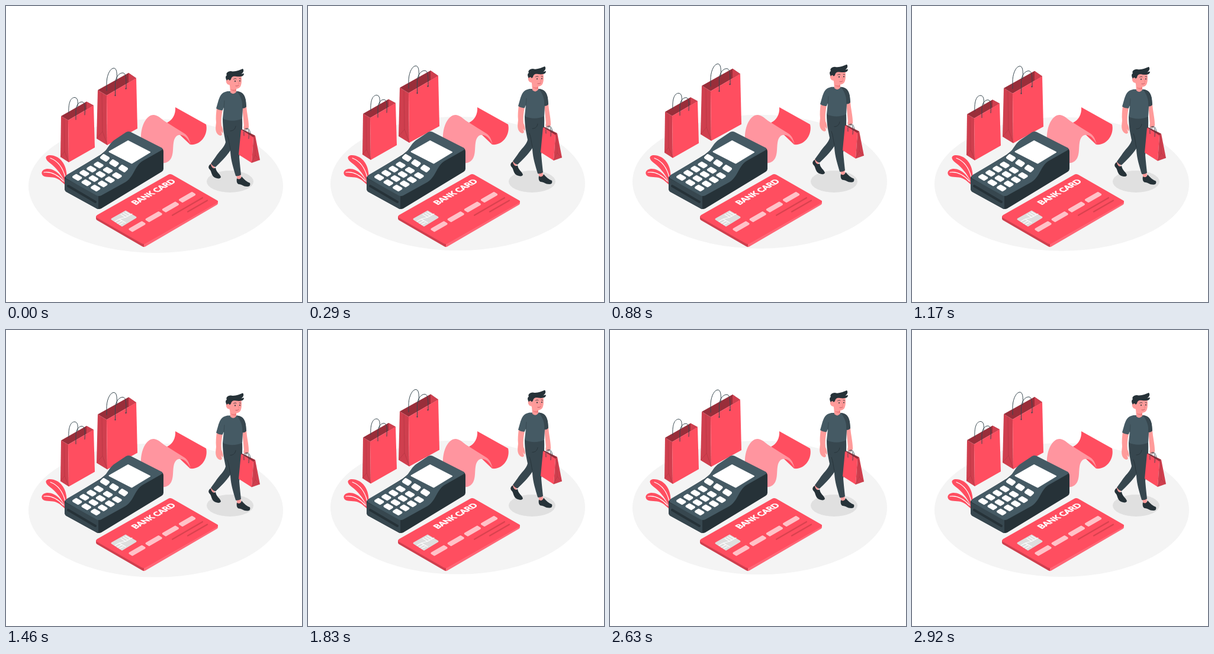
Write an HTML page with a canvas that moves like this. It is 500 px wide and 500 px high and loops after 2.96 s.

```html
<!DOCTYPE html>
<html lang="en">
<head>
<meta charset="utf-8">
<title>Card payment</title>
<style>
html, body { margin: 0; width: 100%; height: 100%; overflow: hidden; background: #fff; }
canvas { display: block; width: 500px; height: 500px; }
</style>
</head>
<body>
<canvas id="stage" width="500" height="500"></canvas>
<script>
const ctx = document.getElementById('stage').getContext('2d');
const LOOP = 2960, STEP = 1000 / 24, FLOAT = 1500, RISE = 10;
const RED = '#ff4e60', SIDE = '#cf3f4e', FOLD = '#b83845', DEEP = '#992e3a', PINK = '#ff959f';
const DARK = '#263238', SLATE = '#37474f', STEEL = '#455a64', SKIN = '#ff9b9a';

function fill(d, color) {
  ctx.fillStyle = color;
  ctx.fill(new Path2D(d));
}

function line(d, color, width) {
  ctx.strokeStyle = color;
  ctx.lineWidth = width;
  ctx.lineCap = ctx.lineJoin = 'round';
  ctx.stroke(new Path2D(d));
}

// Filled shape whose corners are rounded by its own outline
function soft(d, color, width) {
  fill(d, color);
  line(d, color, width);
}

function ellipse(x, y, rx, ry, color) {
  ctx.fillStyle = color;
  ctx.beginPath();
  ctx.ellipse(x, y, rx, ry, 0, 0, Math.PI * 2);
  ctx.fill();
}

function tile(x, y, ax, ay, bx, by) {
  return `M${x - ax - bx},${y - ay - by}L${x + ax - bx},${y + ay - by}` +
    `L${x + ax + bx},${y + ay + by}L${x - ax + bx},${y - ay + by}Z`;
}

function leaves() {
  fill('M101,303C106,279 99,263 87,255.500C77,250.500 67,251 67.500,257C68.500,263 77,266 82,272C90,280 96,289 99,297Z', RED);
  fill('M101,303C96,287 83,274 69,275C60,276 58,283 63,287C68,290 78,288 85,291C92,294 96,299 101,303Z', RED);
  line('M75,257C88,262 96,273 100,289', '#fff', 1.2);
  line('M64,281C78,279 88,286 97,296', '#fff', 1.2);
}

function smallBag() {
  fill('M93,186L136,161.500L148,168L105,193Z', DEEP);
  fill('M136,161.500L148,168L136,175Z', SIDE);
  line('M106,181C105,164 109,154.500 116,154.500C121,155 122,161 121,170', SLATE, 1);
  fill('M93,186L105,193L106,264L92,255Z', SIDE);
  fill('M105,193L148,168L150,239L106,264Z', RED);
  line('M98,190L99,246L92.500,254M99,246L106,263', FOLD, .8);
  line('M118,192V177C118,168 123,162 128,162C133,162 134,169 133,184', SLATE, 1);
}

function largeBag() {
  fill('M155,142L207,113L220,122L170,151Z', DEEP);
  fill('M207,113L220,122L207,129.500Z', SIDE);
  line('M170,143V128C171,114 177,105 182,105C187,105 188,113 187,126', SLATE, 1);
  fill('M155,142L170,151L171,235L153,224Z', SIDE);
  fill('M170,151L220,122L222,207L171,235Z', RED);
  line('M162,147L163,212L154,223M163,212L171,234', FOLD, .8);
  line('M184.500,151V131C185,120 191,113 197,113C203,113 203,123 203,139', SLATE, 1);
  ellipse(184.5, 151, 1, 1.3, SLATE);
  ellipse(202.5, 139.5, 1, 1.3, SLATE);
}

function receipt() {
  fill('M286,171L338,200C342,216 330,236 311,234L272,197C281,193 287,183 286,171Z', RED);
  fill('M228,225C227,202 238,183 250,184C259,185 264,193 272,197C282,203 291,209 300,214.500' +
    'C308,219 310,227 312,234C306,220 296,215 289,219C279,226 285,246 279,257C275,264 269,266 262,265Z', PINK);
}

function terminal() {
  fill('M99,292Q98,288 103,286L160,251L207,213L263,240Q266,242 266,246V275Q266,278 263,280' +
    'L161,342Q157,344 153,342L102,314Q99,312 99,308Z', DARK);
  fill('M99,291L156,319V343Q154,343 152,341.500L102,314Q99,312 99,308Z', SLATE);
  fill('M101,291Q99,288 103,285L156,254C172,245 171,236 182,227L203,213Q207,211 211,213' +
    'L262,239Q267,241 262,244L232,261C216,270 217,290 199,299L161,320Q157,322 153,320Z', STEEL);
  line('M105,304L151,331', DARK, 4);
  soft('M174.500,246L206,228L243,247L212.500,265.500Z', '#fff', 2);
  for (let c = 0; c < 3; c++) {
    const dx = c * 15.5, dy = c * 9;
    soft(tile(167 + dx, 256.5 + dy, 4, 2.4, 1.9, -1.9), '#fff', 4.4);
    for (let r = 0; r < 4; r++) {
      soft(tile(156.5 - r * 12.1 + dx, 268.5 + r * 7 + dy, 3.9, 2.2, 2.2, -1.4), '#fff', 4.2);
    }
  }
}

function card() {
  fill('M152,355V359Q152,361 154,362L230,406Q231.500,407 233,407V400Z', SIDE);
  fill('M233,400V407Q235,407 236,406L356,336Q358,335 358,333V329Z', '#ff6676');
  fill('M154,358Q150,356 154,353L274,285Q277,283 281,285L356,328Q360,330 356,333L236,401Q233,403 229,401Z', RED);

  ctx.save();
  ctx.transform(.866, -.5, .866, .5, 249, 314);
  ctx.font = 'bold 13.6px Lato, "Open Sans", sans-serif';
  ctx.textAlign = 'center';
  ctx.fillStyle = ctx.strokeStyle = '#fff';
  ctx.lineWidth = .7;
  ctx.fillText('BANK CARD', 0, 4.9);
  ctx.strokeText('BANK CARD', 0, 4.9);
  ctx.restore();

  soft('M179,360L202,347L219,357L196,371Z', '#dedede', 3);
  line('M184,364L191,360L202,366M188,367L195,363M192,369L198,366' +
    'M194,352L202,357L213,351M198,350L205,354M202,348L209,352M191,360L202,357', '#fff', 1.1);

  for (let i = 0; i < 4; i++) {
    soft(tile(221.5 + i * 28.2, 372.5 - i * 16.5, 10.2, -5.9, 2.2, 1.3), '#ffc2c8', 3.5);
  }
  line('M281,353.500L332,324M307,347.500L340,328.500', '#d9424f', 2.2);
}

function legs() {
  fill('M346,266L353,270L351,277L344,273Z', SKIN);
  fill('M388,282L396,281L397,292L391,294Z', SKIN);
  fill('M346,267C342,269 341,273 344,276C348,280 346,286 353,290C358,292 362,292 363,289' +
    'C362,284 355,281 354,273C351,276 347,273 346,267Z', DARK);
  fill('M390,291C389,296 390,300 393,301C399,301 400,305 408,305C412,305 413,302 412,299' +
    'C407,297 402,293 398,288C397,292 393,294 390,291Z', DARK);
  fill('M366,189C366,209 369,219 371,230C369,239 360,245 354,255L346,266Q349,271 354,272' +
    'C362,264 371,256 379,244L388,210Z', SLATE);
  fill('M367,189L399,190C400,212 397,236 394,255C395,267 396,276 397,285Q393,288 388,287' +
    'C384,273 380,262 379,246C377,230 372,212 367,189Z', SLATE);
  line('M388,203C387,209 383,211 379,211M379,242C377,233 377,226 374,219', DARK, .8);
}

function torso() {
  fill('M356,172L366,175C364,184 363,193 364,202C367,208 367,213 366,215L363,211L365,217' +
    'Q363,221 358,217C353,212 354,205 355,197C354,188 355,180 356,172Z', SKIN);
  fill('M399,169L406,169C407,182 410,193 410,202C411,206 408,209 405,209C401,209 401,205 402,202Z', SKIN);
  fill('M374,144C364,146 362,151 359,159L355,173Q360,177 366,176L368,171L366,190' +
    'C376,195 389,195 399,190L400,173Q404,173 406,170C405,156 404,146 390,144Z', STEEL);
  fill('M390,144C400,145 403,150 405,159L406,170Q403,173 399,172C400,162 397,153 390,144Z', SLATE);
  line('M369,160L368,172', SLATE, .8);
}

function head() {
  fill('M378,134L379,146Q385,151 389,145L389,135Z', SKIN);
  fill('M379,140Q384,143 389,140L389,144Q382,145 379,140Z', '#f27f80');
  fill('M376,117L397,114C398,122 399,130 396,136C393,141 384,141 380,137C376,134 375,125 376,117Z', SKIN);
  fill('M374,122C371,124 371,129 374,132C377,134 379,133 379,128C379,124 377,121 374,122Z', SKIN);
  fill('M373,126C370,121 371,118 373,117C371,114 374,110 380,110C387,112 394,108 400,106' +
    'C403,109 400,114 397,115L402,114C402,119 396,120 389,119C384,118 381,119 380,124' +
    'L378,126Q375,122 373,126Z', DARK);
  ellipse(387, 127, .9, 1.2, DARK);
  ellipse(395, 126.5, .8, 1.2, DARK);
  line('M384.500,123.500Q387,121.500 389,123M394,122.500L396.500,123', DARK, .8);
  line('M392,127L394,131L392,131.500', '#f27f80', .8);
  line('M388,135Q391,136 393,134', '#b94a55', .8);
}

function handBag() {
  fill('M397,209L400,208.500L421,219L418,222.500Z', DEEP);
  line('M405,213C405,203 412,205 413,217', SLATE, .9);
  fill('M397,209L418,222L415,265L393,251Z', RED);
  fill('M418,222L421,219L429,260L415,265Z', SIDE);
  line('M420,221L421,252L415,264M421,252L428,260', FOLD, .7);
  line('M402,219C401,208 404,206 407,207C410,209 411,216 410,224', SLATE, .9);
}

function man() {
  legs();
  torso();
  head();
  handBag();
}

function floating(y, draw) {
  ctx.save();
  ctx.translate(0, y);
  draw();
  ctx.restore();
}

function lift(t) {
  const tick = Math.floor((t + 4) / STEP) + 1;
  const p = (tick * STEP % FLOAT) / FLOAT;
  return -RISE * (1 - Math.abs(1 - 2 * p));
}

function render(t) {
  const y = lift(t) + .55;
  ctx.fillStyle = '#fff';
  ctx.fillRect(0, 0, 500, 500);
  floating(y, () => ellipse(253, 304, 215, 113, '#f4f4f4'));
  ellipse(378.5, 296.5, 39.5, 18.5, '#e0e0e0');
  leaves();
  floating(y, () => { smallBag(); largeBag(); });
  receipt();
  terminal();
  card();
  floating(y, man);
}

const start = performance.now();
function frame() {
  render((performance.now() - start) % LOOP);
  requestAnimationFrame(frame);
}
frame();
</script>
</body>
</html>
```
